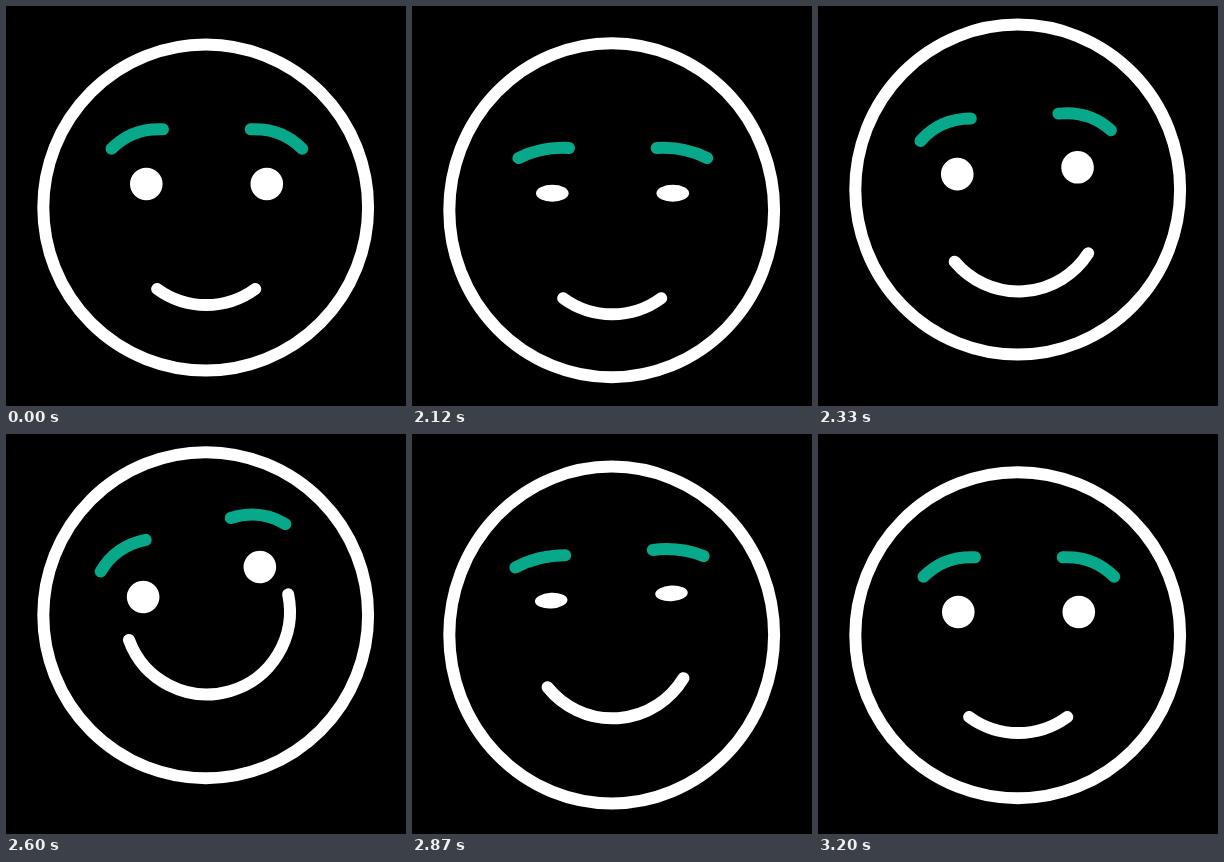
An HTML page that plays this animation: 400x400 px, repeating every 3830 ms.

```html
<!DOCTYPE html>
<html lang="en">
<head>
<meta charset="utf-8">
<title>Smiling face</title>
<style>
  html, body { margin: 0; width: 100%; height: 100%; overflow: hidden; background: #000; }
  svg { display: block; width: 100%; height: 100%; }
  .line { fill: none; stroke: #fff; stroke-width: 12; stroke-linecap: round; }
  .brow { stroke: #08a88a; }
  .eye { fill: #fff; }
</style>
</head>
<body>
<svg viewBox="0 0 400 400">
  <ellipse id="head" class="line" cx="199.7" rx="162.4"/>
  <path id="mouth" class="line"/>
  <g id="face">
    <path id="browL" class="line brow"/>
    <path id="browR" class="line brow"/>
    <ellipse id="eyeL" class="eye" cx="140.3" cy="178" rx="16.3"/>
    <ellipse id="eyeR" class="eye" cx="260.8" cy="178" rx="16.3"/>
  </g>
</svg>
<script>
// The face rests, then hops up and back in 40 steps with its highest point at PEAK.
const LOOP = 3830, START = 2000, STEP = 30, STEPS = 40, PEAK = 20;
const $ = id => document.getElementById(id);
const head = $('head'), mouth = $('mouth'), face = $('face');
const browL = $('browL'), browR = $('browR');
const eyes = [$('eyeL'), $('eyeR')];

const clamp = (x, low, high) => Math.min(high, Math.max(low, x));

function ease(x, from, to) {
  const u = clamp((x - from) / (to - from), 0, 1);
  return u * u * (3 - 2 * u);
}

// Rises from 0 to 1, then falls back to 0
const hop = (x, from, top, leave, to) => ease(x, from, top) - ease(x, leave, to);

// Soft pulse of height 1 around a centre
const pulse = (x, centre, width) =>
  Math.cos(clamp((x - centre) / width, -1, 1) * Math.PI / 2) ** 2;

function arc(cx, cy, r, left, right) {
  const rad = Math.PI / 180;
  const point = a => `${cx + r * Math.sin(a * rad)} ${cy + r * Math.cos(a * rad)}`;
  return `M${point(-left)}A${r} ${r} 0 ${left + right > 180 ? 1 : 0} 0 ${point(right)}`;
}

function brow(blink, mapX) {
  const drop = 13 * blink;
  return `M${mapX(105.5 + 1.3 * blink)} 142.8Q${mapX(126 + 4 * blink)} ${121.8 + drop} ${mapX(157)} ${123.3 + drop}`;
}

function draw(time) {
  const n = clamp(Math.floor((time % LOOP - START) / STEP), 0, STEPS);
  const land = pulse(n, 33.3, 3.5);
  const dip = 10 * (pulse(n, 4.7, 4) + land);
  const blink = 1.1 * (pulse(n, 6, 5) + pulse(n, 30.8, 5));
  const tilt = 14.4 * hop(n, 7, PEAK, PEAK, 33.2);
  const grin = hop(n, 5, PEAK, PEAK, 35.5);

  const headY = 201.2 - 20 * hop(n, 2, 13.5, PEAK, 29.5) + 5 * pulse(n, 3.3, 4) + 2.5 * land;
  const stretch = 16 * pulse(n, 7, 6) + 12 * pulse(n, 28, 5) - 5 * land;
  head.setAttribute('cy', headY);
  head.setAttribute('ry', 163 + stretch / 2);

  const smile = 36.2 + 49.7 * grin, lean = 1.11 * tilt;
  mouth.setAttribute('d', arc(200.2 + 0.05 * tilt, 216 - 38.6 * grin + dip, 83, smile - lean, smile + lean));

  const faceY = dip - 30 * hop(n, 5, 18, 22, 36);
  face.setAttribute('transform', `translate(${-0.35 * tilt} ${faceY}) rotate(${-tilt} 200.5 178)`);
  browL.setAttribute('d', brow(blink, x => x));
  browR.setAttribute('d', brow(blink, x => 401.7 - x));
  for (const eye of eyes) eye.setAttribute('ry', 16.3 - 10.8 * blink);
}

const begin = performance.now();
function tick() {
  draw(performance.now() - begin);
  requestAnimationFrame(tick);
}
tick();
</script>
</body>
</html>
```
